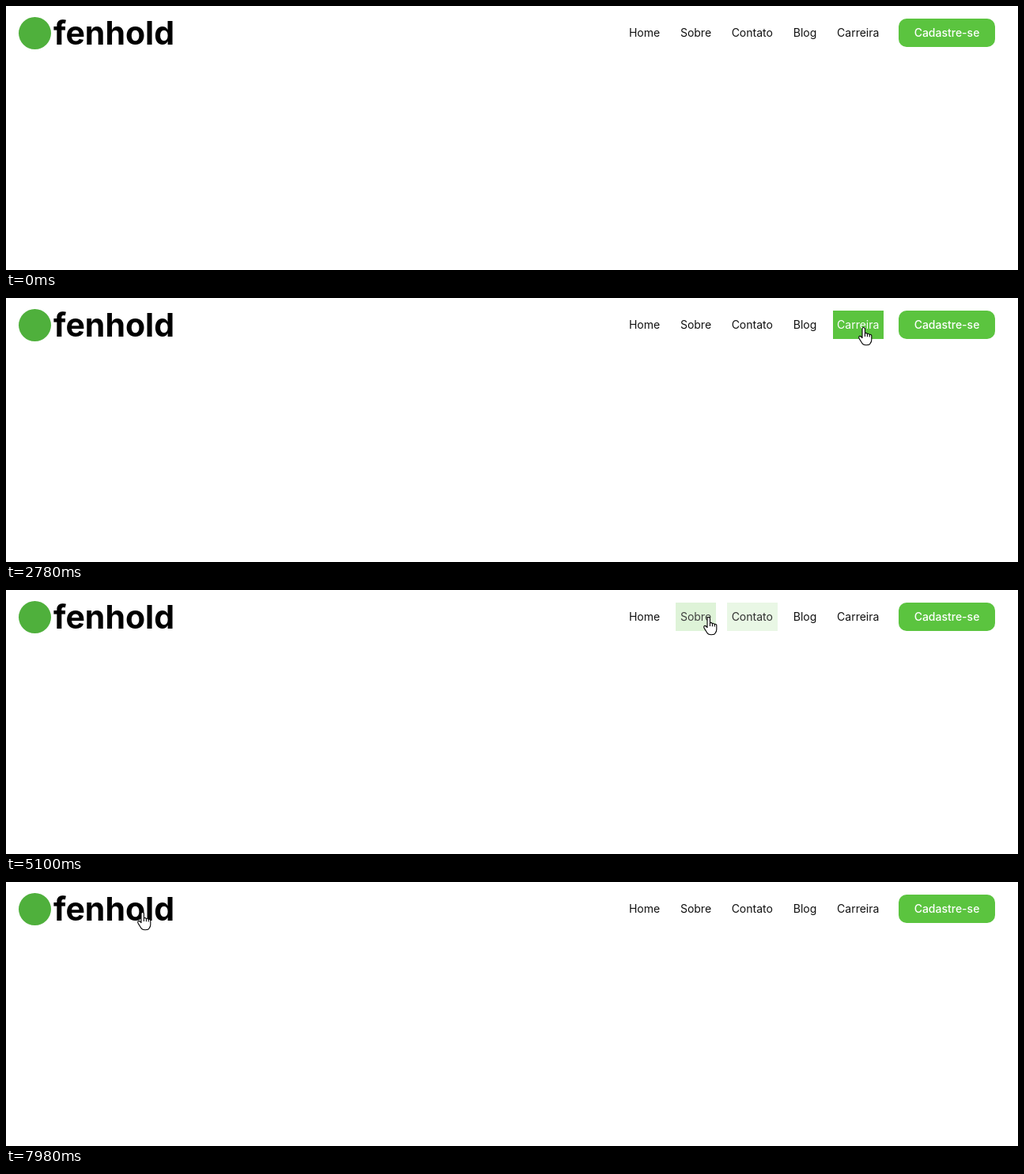
An HTML page that plays this animation: 1280 by 335 pixels, repeating every 8000 ms.

```html
<!DOCTYPE html>
<html lang="pt">
<head>
<meta charset="utf-8">
<style>
html, body { margin: 0; width: 100%; height: 100%; overflow: hidden; background: #fff; }
body { position: relative; font: 14px/36px Inter, "Open Sans", sans-serif; }
.logo { position: absolute; left: 15.5px; top: 13.5px; width: 41px; height: 41px; border-radius: 50%; background: #4fb03c; }
.brand { position: absolute; left: 60px; top: 10px; font-size: 41px; line-height: 48px; font-weight: 700; color: #000; white-space: nowrap; }
.item { position: absolute; top: 15.5px; height: 36px; text-align: center; white-space: nowrap; color: #111; }
.button { left: 1129px; width: 122px; border-radius: 10px; background: #5bc43f; color: #fff; font-weight: 500; }
svg { position: absolute; left: 0; top: 0; width: 1280px; height: 335px; overflow: hidden; }
path { fill: #fff; stroke: #000; stroke-width: 1.1; stroke-linejoin: round; }
</style>
</head>
<body>
<div class="logo"></div>
<div class="brand">fenhold</div>
<div class="item button">Cadastre-se</div>
<svg>
  <g id="arrow"><path d="M.5 .5V17L4.3 13.4L6.8 18.8L9 17.8L6.6 12.4H11.8Z"/></g>
  <g id="hand">
    <path d="M-2 13V2.2a1.7 1.7 0 0 1 3.4 0V8q1.5 -1.6 3 .6q1.5 -1 2.8 .9q1.9 -.7 2.6 1.3V16q0 2.6 -1.7 4.6Q7.6 22.7 3 22.7Q-1.2 22.7 -2.4 20L-5.8 14.6q-1.2 -2.6 .5 -3.2q1.4 -.3 3.3 2.2Z"/>
    <path d="M1.4 8v4M4.4 8.6v3.6M7.2 9.5v3" style="fill:none"/>
  </g>
</svg>
<script>
const LOOP = 8000, STEP = 70, FADE = 300;

// Each leg carries the pointer from the last resting place to (x, y).
// lag below 1 starts briskly, above 1 starts late; bend bows the way.
const legs = [
  { from: 260, to: 610, x: 1098, y: 180 },
  { from: 810, to: 1560, x: 1164, y: 32, bend: [12, 0] },
  { from: 2090, to: 2780, x: 1085, y: 37 },
  { from: 3040, to: 3750, x: 1020, y: 33 },
  { from: 4080, to: 4840, x: 912.5, y: 34 },
  { from: 4910, to: 5370, x: 853, y: 35, lag: 1 },
  { from: 5840, to: 6460, x: 786, y: 36, lag: 2.3 },
  { from: 6860, to: 7630, x: 240, y: 73, bend: [0, 96] },
  { from: 7700, to: 7980, x: 173, y: 38 }
];
const entry = { x: 1220, y: 289 };

function pointer(t) {
  let pos = entry;
  for (const { from, to, x, y, lag = 0.65, bend = [0, 0] } of legs) {
    if (t < from) break;
    const u = Math.min(1, (t - from) / (to - from));
    const p = (u * u * (3 - 2 * u)) ** lag, bow = 2 * p * (1 - p);
    pos = {
      x: pos.x + (x - pos.x) * p + bend[0] * bow,
      y: pos.y + (y - pos.y) * p + bend[1] * bow
    };
  }
  return pos;
}

// Time advances in even steps while a leg is under way.
function stepTime(t) {
  const leg = legs.find(l => t >= l.from && t < l.to);
  if (!leg) return t;
  const span = leg.to - leg.from, dt = span / Math.round(span / STEP);
  return leg.from + Math.floor((t - leg.from) / dt + 0.15) * dt;
}

const inBar = y => y >= 15 && y <= 52;
const over = (it, { x, y }) => inBar(y) && x >= it.x && x <= it.x + it.w;

function makeItem([label, x, w]) {
  const el = document.createElement("div");
  el.className = "item";
  el.textContent = label;
  el.style.left = x + "px";
  el.style.width = w + "px";
  document.body.insertBefore(el, document.querySelector("svg"));
  const it = { el, x, w };
  for (let t = 0; t < LOOP; t += 5) {
    const inside = over(it, pointer(t));
    if (inside && it.on === undefined) it.on = t;
    if (!inside && it.on !== undefined && it.off === undefined) it.off = t;
  }
  return it;
}

const items = [
  ["Home", 782, 51], ["Sobre", 847, 51], ["Contato", 912, 63.5],
  ["Blog", 990, 41], ["Carreira", 1045.5, 64.5]
].map(makeItem);
const button = { x: 1129, w: 122 };

// CSS "ease" curve, solved by bisection
function ease(u) {
  if (u <= 0) return 0;
  if (u >= 1) return 1;
  let lo = 0, hi = 1, s;
  for (let i = 0; i < 20; i++) {
    s = (lo + hi) / 2;
    if (0.75 * s * (1 - s) + s ** 3 < u) lo = s; else hi = s;
  }
  return 0.3 * s * (1 - s) ** 2 + 3 * s * s * (1 - s) + s ** 3;
}

const arrow = document.getElementById("arrow"), hand = document.getElementById("hand");

function place(el, pos, shown) {
  el.setAttribute("transform", `translate(${Math.round(pos.x)} ${Math.round(pos.y)})`);
  el.style.display = shown ? "" : "none";
}

function draw(time) {
  const t = stepTime(time), pos = pointer(t);
  for (const { el, on, off } of items) {
    const k = ease((t - on) / FADE) - ease((t - off) / FADE);
    const c = Math.round(17 + 238 * k);
    el.style.color = `rgb(${c},${c},${c})`;
    el.style.background = `rgba(91,196,63,${k})`;
  }
  const overBrand = pos.x < 214 && pos.y < 56;
  const link = overBrand || [...items, button].some(it => over(it, pos));
  const visible = t >= legs[0].from;
  place(arrow, pos, visible && !link);
  place(hand, pos, visible && link);
}

const start = performance.now();
function tick() {
  draw((performance.now() - start) % LOOP);
  requestAnimationFrame(tick);
}
tick();
</script>
</body>
</html>
```
